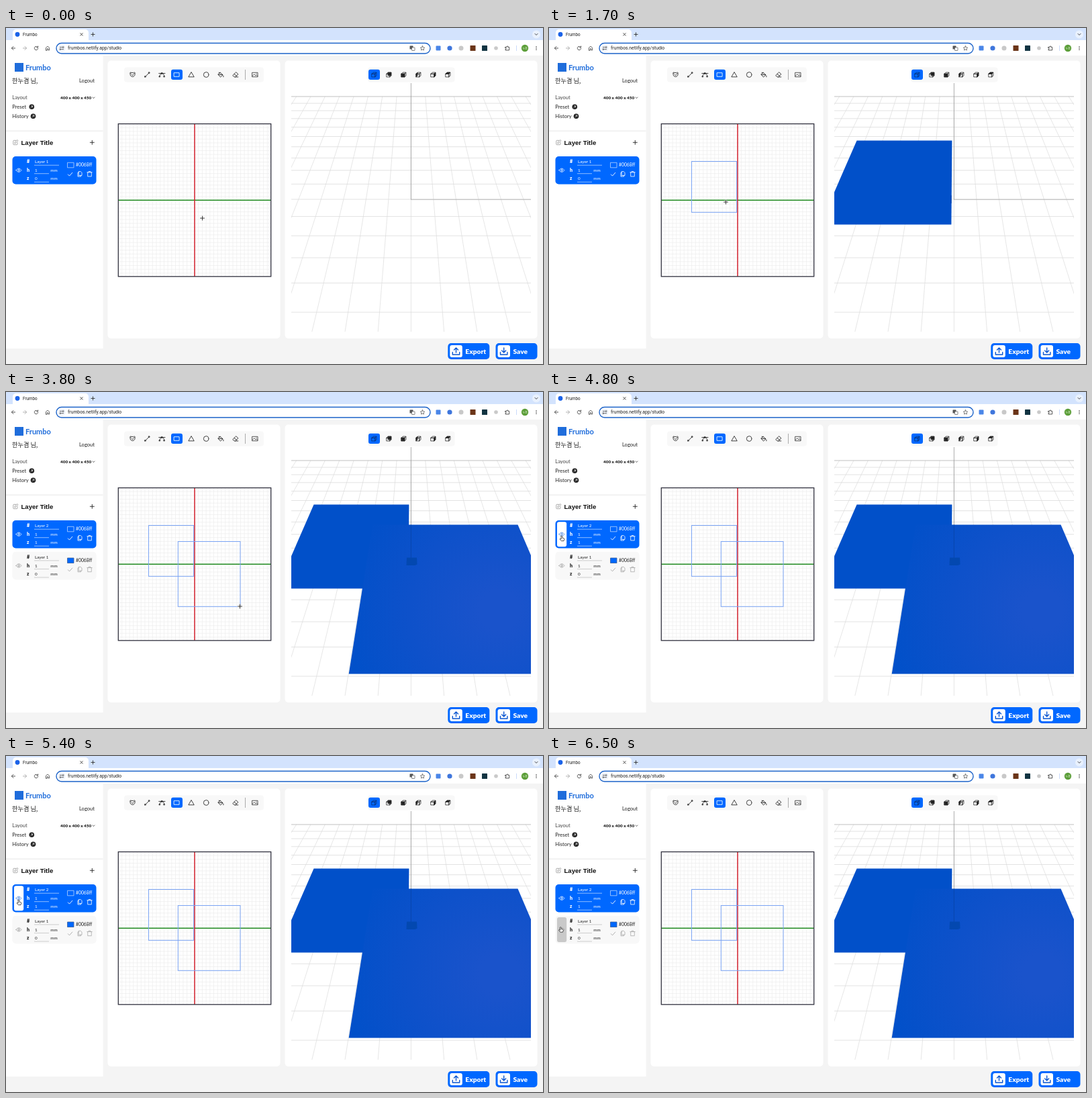
An HTML page with a canvas that plays this animation: 800 by 500 pixels, repeating every 7580 ms.

```html
<!DOCTYPE html>
<html lang="en">
<head>
<meta charset="utf-8">
<title>Studio</title>
<style>
html, body { margin: 0; width: 100%; height: 100%; overflow: hidden; background: #f4f4f4; }
canvas { display: block; width: 100vw; height: 100vh; }
</style>
</head>
<body>
<canvas id="stage"></canvas>
<script>
const LOOP = 7580, STEP = 100;
const BLUE = '#0068ff', INK = '#222', PAGE = '#f4f4f4', SOFT = '#f8f8f8';
const UI = 'Lato, sans-serif', CHROME = 'Roboto, sans-serif';
const KOREAN = '"Noto Sans CJK KR", "Noto Sans CJK", sans-serif';
const canvas = document.getElementById('stage');
const c = canvas.getContext('2d');
const ratio = window.devicePixelRatio || 1;
canvas.width = 800 * ratio;
canvas.height = 500 * ratio;

// Drawing helpers
function box(x, y, w, h, r, fill, stroke, width = 1) {
  c.beginPath();
  c.roundRect(x, y, w, h, r);
  paint(fill, stroke, width);
}
function disc(x, y, r, fill, stroke, width = 1) {
  c.beginPath();
  c.arc(x, y, r, 0, 7);
  paint(fill, stroke, width);
}
function paint(fill, stroke, width) {
  if (fill) { c.fillStyle = fill; c.fill(); }
  if (stroke) { c.strokeStyle = stroke; c.lineWidth = width; c.stroke(); }
}
function line(x1, y1, x2, y2, color, width = 1) {
  c.beginPath();
  c.moveTo(x1, y1);
  c.lineTo(x2, y2);
  paint(null, color, width);
}
function text(s, x, y, size, color = INK, weight = 400, family = UI) {
  c.font = `${weight} ${size}px ${family}`;
  c.fillStyle = color;
  c.fillText(s, x, y);
}
function icon(x, y, path, stroke = INK, width = 0.8, fill) {
  c.save();
  c.translate(x, y);
  const shape = new Path2D(path);
  if (fill) { c.fillStyle = fill; c.fill(shape); }
  if (stroke) {
    c.strokeStyle = stroke;
    c.lineWidth = width;
    c.lineCap = c.lineJoin = 'round';
    c.stroke(shape);
  }
  c.restore();
}
function poly(points, fill) {
  c.beginPath();
  points.forEach(([x, y]) => c.lineTo(x, y));
  c.closePath();
  paint(fill);
}

const PLUS = 'M-3 0H3M0-3V3';
const EYE = 'M-4 0Q0-5.6 4 0Q0 5.6-4 0ZM1.3 0A1.3 1.3 0 1 1-1.3 0A1.3 1.3 0 1 1 1.3 0';

function browser() {
  box(0, 0, 800, 20, 0, '#d3e3fd');
  box(10, 2, 113, 18, [5, 5, 0, 0], '#fff');
  box(0, 18, 800, 23, 0, '#fff');
  disc(17, 9.5, 3.4, '#1a62e8');
  text('Frumbo', 25, 12, 6.3, INK, 400, CHROME);
  icon(112.5, 9.5, 'M-1.7-1.7L1.7 1.7M1.7-1.7L-1.7 1.7', '#333', 0.9);
  icon(129.5, 9.5, 'M-2.6 0H2.6M0-2.6V2.6', '#333', 0.9);
  disc(790, 9.5, 6, '#e9f1fe');
  icon(790, 9.5, 'M-2-1L0 1L2-1', '#333', 0.9);

  icon(11, 30, 'M2.6 0H-2.6M0-2.6L-2.6 0L0 2.6', '#444', 0.9);
  icon(28, 30, 'M-2.6 0H2.6M0-2.6L2.6 0L0 2.6', '#aaa', 0.9);
  icon(45, 30, 'M2.3-1.4A2.7 2.7 0 1 0 2.7 .5M2.6-3V-1H.6', '#444', 0.9);
  icon(62, 30, 'M-2.6 3V-.6L0-2.8L2.6-.6V3H.8V.8H-.8V3Z', '#444', 0.8);
  box(75, 22.5, 557, 15.5, 7.75, '#fff', '#1c63c9', 1.4);
  disc(83, 30, 5.5, '#eef2f9');
  icon(83, 30, 'M-2.6-1.4H.2M1.2-1.4A.9.9 0 1 0 3-1.4A.9.9 0 1 0 1.2-1.4M2.6 1.6H-.2M-1.2 1.6A.9.9 0 1 0-3 1.6A.9.9 0 1 0-1.2 1.6', '#444', 0.8);
  text('frumbos.netlify.app/studio', 92, 32.4, 6.8, INK, 400, CHROME);
  box(601.5, 26.5, 5, 5, 0.5, '#555');
  box(604.5, 29, 4.5, 4.5, 0.5, '#fff', '#555', 0.7);
  icon(620.5, 30, 'M0-3.2L1-1.1L3.2-.8L1.6.8L2 3L0 2L-2 3L-1.6.8L-3.2-.8L-1-1.1Z', '#444', 0.7);
  box(640.5, 26.5, 7, 7, 1, '#4a86e8');
  disc(661, 30, 3.6, '#3f76dc');
  disc(678, 30, 3.5, '#c8c8c8');
  box(691.5, 26, 8, 8, 0.5, '#6b3518');
  box(709, 26, 8, 8, 0.5, '#123442');
  disc(730, 30, 2.8, '#c9c9c9');
  icon(747, 30, 'M-3-1.6H-1A1 1 0 1 1 .9-1.6H2.6V3H-3V1.4A.9.9 0 1 0-3-.3Z', '#444', 0.9);
  line(760.5, 26, 760.5, 34, '#c9dafa');
  disc(773, 30, 5.2, '#5b9e38');
  text('누겸', 769.2, 31.5, 4, '#e8f4df', 400, KOREAN);
  [-2.3, 0, 2.3].forEach(d => disc(790, 30 + d, 0.75, '#444'));
}

function sidebar() {
  box(0, 41, 144.5, 436, 0, '#fff');
  box(0, 152, 144.5, 2.5, 0, PAGE);
  box(13, 52, 13, 13, 0, '#1f6ddb');
  text('Frumbo', 29, 62.5, 11, '#1f6ddb', 700);
  text('한누겸 님,', 9, 82, 9.2, INK, 500, KOREAN);
  text('Logout', 109, 81.3, 7.6);
  text('Layout', 9.3, 106.3, 7.5, '#444');
  text('400 x 400 x 450', 81, 105.7, 6.4, INK, 900);
  icon(130.5, 103.8, 'M-1.6-.8L0 .8L1.6-.8', INK, 0.7);
  [['Preset', 117.3, 38.3], ['History', 131.2, 40.5]].forEach(([label, y, x]) => {
    text(label, 9.3, y + 3, 7.5);
    disc(x, y, 3.8, INK);
    icon(x, y, 'M-1.4 1.4L1.3-1.3M-.7-1.3H1.3V.7', '#fff', 0.7);
  });
  icon(14, 170.5, 'M1-3.2H-2.4Q-3.2-3.2-3.2-2.4V2.4Q-3.2 3.2-2.4 3.2H2.2Q3 3.2 3 2.4V0M-1 1L-.6-.8L2.8-4L4-2.8L.7.6Z', '#888', 0.7);
  text('Layer Title', 22.5, 173.8, 9.6, '#111', 700, '"Liberation Sans", sans-serif');
  icon(128.3, 170.3, PLUS, INK, 0.9);
}

function layer(top, n, active, hover, hidden) {
  const fg = active ? '#fff' : INK, dim = active ? '#fff' : '#aaa';
  const rule = active ? 'rgba(255,255,255,.8)' : '#bbb';
  const eyeInk = active ? (hover ? '#3b7ddd' : '#fff') : '#999';
  c.save();
  c.translate(0, top);
  box(9.5, 0, 125, 41.5, 5, active ? BLUE : SOFT);
  if (hover) box(12, 2.3, 14.2, 37, 3, active ? '#fff' : '#c9c9c9');
  icon(19, 20.7, EYE + (hidden ? 'M-3.4-3.2L3.4 3.2' : ''), eyeInk, 0.75);
  [['#', `Layer ${n}`, 79], ['h', '1', 64], ['z', String(n - 1), 64]].forEach(([key, value, end], i) => {
    const y = 10.3 + i * 12.5;
    text(key, 31, y, 7.3, fg, 900);
    text(value, 43, y, 6.3, fg);
    line(42, y + 2.9, end, y + 2.9, rule, 0.7);
    if (i) text('mm', 66.3, y, 6.4, fg);
  });
  box(91.5, 9.3, 9.5, 7.5, 0, BLUE, active ? '#b9d5ff' : '#3d5f95', 0.8);
  text('#0068ff', 104, 15.4, 6.8, fg);
  icon(95.5, 26.6, 'M-3.2 .3L-1 2.5L3.3-2.3', dim, 0.9);
  icon(110, 26.2, 'M-1.5-3.6H1.3L3-1.9V2.2H-1.5ZM-1.5-2H-3V3.8H1.5V2.3', dim, 0.8);
  icon(124.5, 26.2, 'M-3.7-2.4H3.7M-1.4-2.4V-3.7H1.4V-2.4M-2.8-2.4V3.7H2.8V-2.4', dim, 0.8);
  c.restore();
}

function toolbars() {
  box(151.5, 48.5, 257, 413.5, 5, '#fff');
  box(415.5, 48.5, 376, 413.5, 5, '#fff');
  box(176, 58.5, 208, 22, 4, SOFT);
  box(539, 58.5, 129.5, 22, 4, SOFT);
  box(246, 61.8, 17, 15.2, 3, BLUE);
  box(540, 61.8, 17, 15.2, 3, BLUE);
  line(356.5, 62, 356.5, 77, '#999', 0.8);
  const tools = [
    'M-3.3-2A3.6 3.6 0 1 0 3.3-2L0-3ZM-4-2.3L-2.7-3.8M4-2.3L2.7-3.8M-1.5-.3L.2 1.2L1.6-.5',
    'M-2.4 2.4L2.4-2.4M-3.6 2.2H-2.2V3.6H-3.6ZM2.2-3.6H3.6V-2.2H2.2Z',
    'M-3.4 2.5Q-3-2 0-2Q3-2 3.4 2.5M-4.6-2H4.6M-.8-2.8H.8V-1.2H-.8ZM-4 2.2H-2.8V3.4H-4ZM2.8 2.2H4V3.4H2.8Z',
    'M-3.8-2.8H3.8V2.8H-3.8Z',
    'M0-3.6L4 3.3H-4Z',
    'M3.8 0A3.8 3.8 0 1 1-3.8 0A3.8 3.8 0 1 1 3.8 0',
    'M-1-3.4L3 .4L-.6 3.6L-4-.2ZM-3-3.4L-1-1.4M-3.8 0H2.6M3.8 1.6V3.3',
    'M1-3.5L4-.7L-.4 3.4H-2L-4 1.4ZM-2-1L1.7 2M-.4 3.4H3.8'
  ];
  tools.forEach((path, i) => icon(188.5 + i * 21.93, 69.5, path, i === 3 ? '#fff' : INK, 0.85));
  icon(371, 69.5, 'M-4-3.2H4V3.2H-4ZM-4 1.8L-1.2-.7L1 1.5L2.2.5L4 2M1.6-1.4H2', INK, 0.75);

  const front = 'M-3.4-1.4H1.4V3.4H-3.4Z', top = 'M-3.4-1.4L-1.4-3.4H3.4L1.4-1.4Z';
  const right = 'M1.4-1.4L3.4-3.4V1.4L1.4 3.4Z', left = 'M-3.4-1.4L-1.4-3.4V1.4L-3.4 3.4Z';
  const faces = ['', 'M-1.4-3.4H3.4V1.4H-1.4Z', front, left, right, top];
  faces.forEach((face, i) => {
    const x = 548.5 + i * 22;
    icon(x, 69.5, front + top + right, i ? INK : '#0b2f70', 0.75);
    if (face) icon(x, 69.5, face, INK, 0.5, INK);
  });
}

function button(x, label, arrow) {
  box(x, 469, 62, 24, 5, BLUE);
  box(x + 3, 472, 18.5, 18, 3, '#fff');
  icon(x + 12.2, 481, 'M-5.2 1.5V5H5.2V1.5' + arrow, '#0a55d0', 1.4);
  text(label, x + 26, 485, 10.2, '#fff', 900);
}

function sketch(rects) {
  for (let i = 1; i < 40; i++) {
    const d = i * 5.7;
    line(167 + d, 143, 167 + d, 370, '#ececec', 0.7);
    line(167, 142.5 + d, 395, 142.5 + d, '#ececec', 0.7);
  }
  line(167, 256.3, 395, 256.3, '#218a21', 1.5);
  line(281, 143, 281, 370, '#d3202c', 1.5);
  c.strokeStyle = '#333340';
  c.lineWidth = 1.3;
  c.strokeRect(167.3, 142.6, 227.4, 227.2);
  c.strokeStyle = '#7ba4f4';
  c.lineWidth = 1;
  rects.forEach(([x1, y1, x2, y2]) => c.strokeRect(x1, y1, x2 - x1, y2 - y1));
}

// Perspective floor: depth grows away from the viewer
const rowY = depth => 7391 / depth - 166.4;
const colX = (col, depth) => 603.4 + col * 588 / depth;

function scene(slab1, slab2) {
  c.save();
  c.beginPath();
  c.rect(425, 82, 357, 370);
  c.clip();
  const near = 11.5, mid = 17.54, far = 27.54;
  for (let i = -10; i <= 10; i++) {
    line(colX(i, near), rowY(near), colX(i, far), rowY(far), '#dcdcdc', 0.7);
    if (i >= -5) {
      const y = rowY(mid + i);
      line(425, y, 782, y, i === 10 ? '#b0b0b0' : '#dcdcdc', 0.8);
    }
  }
  line(603, 255.2, 782, 255.2, '#aaa', 0.8);
  line(603.4, 82, 603.4, 255, '#999', 0.8);

  const shade = c.createRadialGradient(735, 325, 30, 735, 325, 235);
  shade.addColorStop(0, '#1a53cb');
  shade.addColorStop(0.5, '#0e51ca');
  shade.addColorStop(1, '#0150c9');
  if (slab1) {
    poly([[458.5, 167.5], [600.4, 167.5], [599.4, 292.5], [404, 292.5]], '#0150c9');
    box(598, 249, 1.5, 12, 0, '#0045b2');
  }
  if (slab2) {
    poly([[546, 197.6], [762.5, 197.6], [782, 243], [782, 419.5], [510.7, 419.5]], shade);
    line(603.4, 197.6, 603.4, 247, '#0a45a8', 0.8);
    poly([[597, 246.5], [612, 246.5], [612.5, 256.5], [609, 258], [596.5, 258]], '#0348b0');
  }
  c.restore();
}

// Pointer path: time, x, y
const path = [
  [0, 292.5, 283], [800, 212.5, 198.5], [1600, 279.6, 274.3], [1700, 263.5, 259],
  [2300, 128, 170], [2500, 128, 170], [3100, 254.5, 221.5], [3200, 256.3, 222.5],
  [3700, 349, 319.3], [3800, 348.5, 319], [4000, 153, 283], [4100, 150, 283], [4200, 150, 283],
  [4800, 19, 215], [5400, 19, 215], [5800, 19, 255.5], [6100, 19, 255.5], [6200, 17.5, 255.5]
];
function pointerAt(t) {
  const i = path.findIndex(p => p[0] > t);
  if (i < 0) return path[path.length - 1].slice(1);
  const [t0, x0, y0] = path[i - 1], [t1, x1, y1] = path[i];
  const k = (t - t0) / (t1 - t0), e = k * k * (3 - 2 * k);
  return [x0 + (x1 - x0) * e, y0 + (y1 - y0) * e];
}
function pointer(x, y, overButton) {
  if (x >= 150) {
    icon(x, y, PLUS, '#fff', 1.8);
    icon(x, y, PLUS, '#222', 0.9);
  } else if (overButton) {
    icon(x, y, 'M-1-.6Q0-1.5 .7-.5V2L3 2.6Q4 3 3.8 4L3 6.6H-.7L-3 3.8Q-2.7 2.7-1 3.6Z', '#222', 0.75, '#fff');
  } else {
    icon(x, y, 'M0 0V7L1.7 5.5L2.8 8L4 7.5L2.9 5H5Z', '#fff', 0.6, '#111');
  }
}

function draw(t) {
  const [x, y] = pointerAt(t);
  const hide1 = t >= 6000 && t < 6400, hide2 = t >= 5000 && t < 5400;
  const added = t >= 2500;
  const inBar = top => x > 12 && x < 26.2 && y > top + 2 && y < top + 39;
  const over1 = inBar(added ? 237.7 : 191), over2 = added && inBar(191);
  const overPlus = Math.hypot(x - 128, y - 170) < 6;

  const rects = [];
  if (t > 800 && !hide1) rects.push([212.5, 198.5, ...(t < 1600 ? [x, y] : [279.6, 274.3])]);
  if (t > 3200 && !hide2) rects.push([256.3, 222.5, ...(t < 3700 ? [x, y] : [349, 319.3])]);

  c.setTransform(ratio, 0, 0, ratio, 0, 0);
  box(0, 0, 800, 500, 0, PAGE);
  browser();
  sidebar();
  if (added) layer(191, 2, true, over2, hide2);
  layer(added ? 237.7 : 191, 1, !added, over1, hide1);
  toolbars();
  sketch(rects);
  scene(t >= 1700 && !hide1, t >= 3800 && !hide2);
  button(658.3, 'Export', 'M0 2V-5M-3-2L0-5L3-2');
  button(729.5, 'Save', 'M0 2V-5M-3-1L0 2L3-1');
  pointer(x, y, overPlus || over1 || over2);
}

const start = performance.now();
let shown = -1;
function tick() {
  const t = (performance.now() - start) % LOOP;
  const step = Math.floor(t / STEP) * STEP;
  if (step !== shown) draw(shown = step);
  requestAnimationFrame(tick);
}
tick();
</script>
</body>
</html>
```
